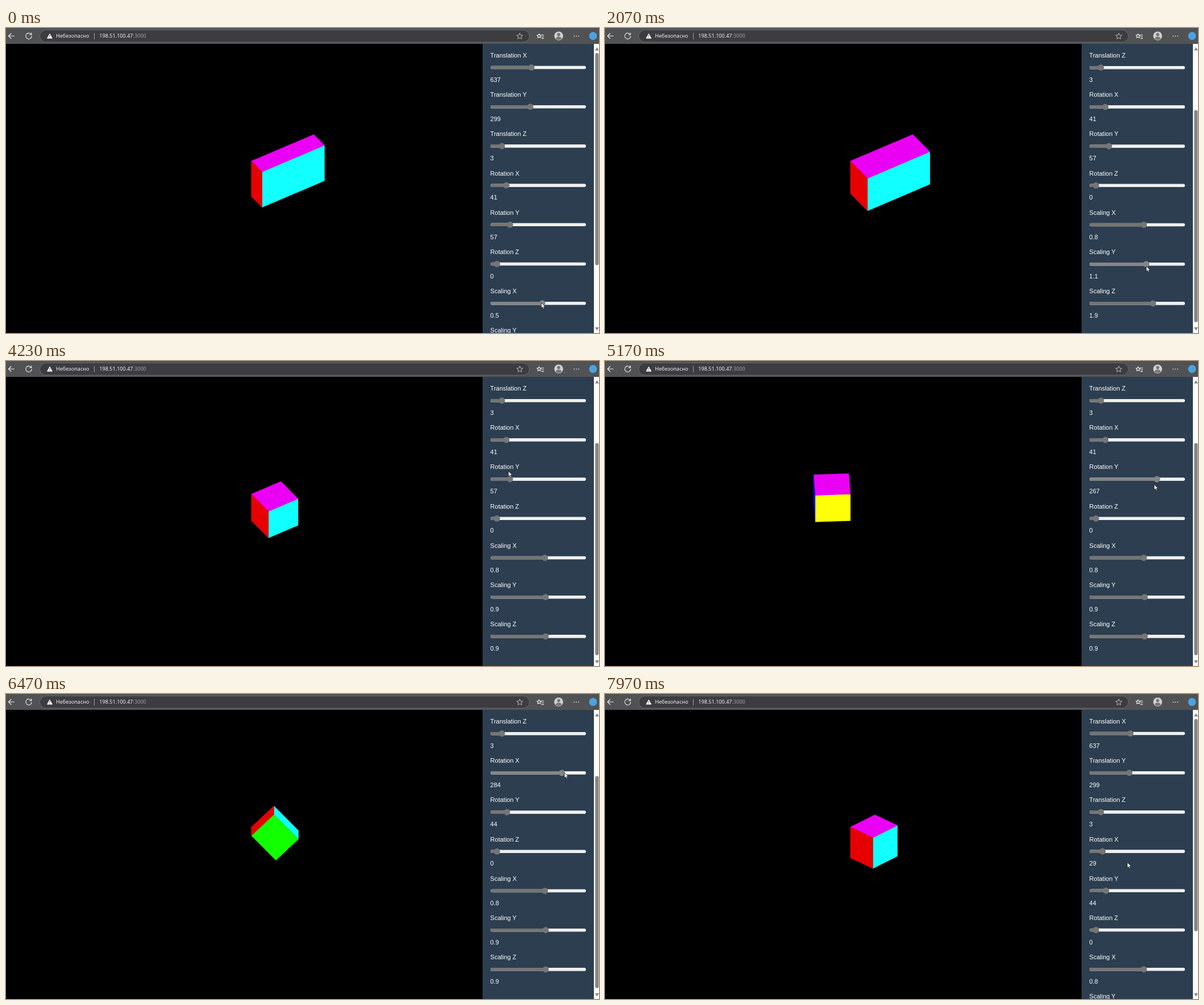
Animation of 1044x537 px, one loop 8000 ms. Source, as an HTML page:

```html
<!DOCTYPE html>
<html lang="en">
<head>
<meta charset="utf-8">
<title>Box transform controls</title>
<style>
  html, body { margin: 0; width: 100%; height: 100%; overflow: hidden; background: #000; }
  svg { display: block; width: 1044px; height: 537px; }
  .bar { font: 9.1px "Open Sans", "Noto Sans", sans-serif; fill: #fff; }
  .panel text { font: 11px "Liberation Sans", Arial, sans-serif; fill: #fff; }
  .icon { fill: none; stroke: #f2f2f2; stroke-width: 1.1; stroke-linecap: round; stroke-linejoin: round; }
</style>
</head>
<body>
<svg viewBox="0 0 1044 537">
  <defs>
    <clipPath id="view"><rect x="839" y="28" width="196" height="509"/></clipPath>
  </defs>
  <rect width="1044" height="537"/>
  <g id="box" stroke-width=".5" stroke-linejoin="round"></g>

  <rect x="839" y="28" width="196" height="509" fill="#2c3e50"/>
  <g clip-path="url(#view)"><g id="rows" class="panel"></g></g>

  <rect x="1035" y="28" width="9" height="509" fill="#fafafa"/>
  <path d="M1037 39.5l3.5-5.5 3.5 5.5zM1037 527l3.5 5.5 3.5-5.5z" fill="#858585"/>
  <rect id="scroll" x="1037.3" y="44" width="6.2" height="373.5" rx="3.1" fill="#858585"/>

  <g id="toolbar">
    <rect width="1044" height="28" fill="#515254"/>
    <rect x="59.5" y="3.5" width="862" height="21.5" rx="10.7" fill="#3c3c41" stroke="#6a6a6c"/>
    <path class="icon" d="M14.5 14H4.5M9 9.5L4.5 14 9 18.5"/>
    <path class="icon" d="M44.3 11.2A5.2 5.2 0 1 0 45.2 14.2M44.8 8.5V11.7H41.6"/>
    <path d="M77 10l4.6 8.2h-9.2z" fill="#fff" stroke="#fff" stroke-width=".6" stroke-linejoin="round"/>
    <path d="M77 12.7v2.6M77 16.3v1" stroke="#3c3c41"/>
    <text class="bar" x="88" y="17.3">Небезопасно</text>
    <path d="M155.5 9v11" stroke="#a0a0a2"/>
    <text class="bar" x="164.3" y="17.3">198.51.100.47<tspan fill="#a9a9ab">:3000</tspan></text>
    <path id="star" class="icon" style="stroke:#a5a5a7"/>
    <path id="fav" class="icon"/>
    <path class="icon" d="M942 12.2h4.5M943 15.3h3.5M943 18.4h3.5"/>
    <circle cx="973" cy="14" r="7.8" fill="#d2d2d2"/>
    <circle cx="973" cy="11.6" r="2.8" fill="#777"/>
    <path d="M967.8 19c0-5 10.4-5 10.4 0a7.8 7.8 0 0 1-10.4 0z" fill="#777"/>
    <path d="M1000.2 14.3h.01M1004.2 14.3h.01M1008.2 14.3h.01" class="icon" style="stroke-width:1.7"/>
    <circle cx="1033.5" cy="14" r="7" fill="#4aa3e0"/>
  </g>

  <path id="cursor" d="M0 0V9.3L2.2 7.3 3.8 10.8 5.3 10.1 3.8 6.8H6.8Z" fill="#fff" stroke="#111" stroke-width=".7"/>
</svg>
<script>
const LOOP = 8000, UNIT = 69, ORIGIN = [432, 234.3];
const ROW = 69.2, MAX_SCROLL = 138.2;
const $ = id => document.getElementById(id);

function el(parent, tag, attrs) {
  const node = document.createElementNS('http://www.w3.org/2000/svg', tag);
  set(node, attrs);
  return parent.appendChild(node);
}
function set(node, attrs) {
  for (const key in attrs) node.setAttribute(key, attrs[key]);
}

// Smooth curve through [time, value] keys that never overshoots them.
function track(...keys) {
  const slopes = keys.slice(1).map((k, i) => (k[1] - keys[i][1]) / (k[0] - keys[i][0]));
  const tangent = i => {
    const a = slopes[i - 1] || 0, b = slopes[i] || 0;
    return a * b > 0 ? 2 * a * b / (a + b) : 0;
  };
  return t => {
    if (t <= keys[0][0]) return keys[0][1];
    const i = keys.findIndex(k => k[0] >= t) - 1;
    if (i < 0) return keys[keys.length - 1][1];
    const [t0, v0] = keys[i], [t1, v1] = keys[i + 1];
    const d = t1 - t0, u = (t - t0) / d, w = 1 - u;
    return v0 * w * w * (1 + 2 * u) + v1 * u * u * (3 - 2 * u)
      + d * u * w * (tangent(i) * w - tangent(i + 1) * u);
  };
}

const rotX = track([6020, 41], [6470, 284], [6640, 335], [7260, 29]);
const rotY = track([4350, 57], [4960, 325], [5170, 267], [5720, 44]);
const scaleX = track([80, .5], [700, .8]);
const scaleY = track([1800, 1.2], [2070, 1.1], [2400, .9]);
const scaleZ = track([2700, 1.9], [3500, .9]);
const scrollTop = track([1010, 0], [1070, 8.8], [1400, MAX_SCROLL], [7490, MAX_SCROLL], [7880, 0]);

const path = [
  [0, 942.5, 484], [600, 947, 484], [800, 950, 482], [1070, 960, 460], [1400, 961, 440],
  [1750, 954, 419], [2070, 953, 419.5], [2420, 951, 420], [2680, 965, 487], [3500, 950, 488],
  [3720, 946, 480], [4230, 884.5, 194], [4350, 886, 208], [4940, 993, 215], [5170, 967, 217.5],
  [5720, 881, 215], [5960, 880, 139], [6050, 883, 139], [6470, 983, 138.5], [6640, 1001, 140],
  [7260, 877, 141], [7520, 905, 250], [7970, 919.5, 296.5]
];
const cursorX = track(...path.map(p => [p[0], p[1]]));
const cursorY = track(...path.map(p => [p[0], p[2]]));

const fixed = v => () => v;
const whole = f => t => Math.round(f(t));
const tenth = f => t => Math.round(f(t) * 10) / 10;
const angleAt = v => 864.3 + .4025 * v;
const scaleAt = v => 936.9 + 14.6 * v;

const sliders = [
  ['Translation X', fixed(637), fixed(925)],
  ['Translation Y', fixed(299), fixed(923)],
  ['Translation Z', fixed(3), fixed(873)],
  ['Rotation X', whole(rotX), angleAt],
  ['Rotation Y', whole(rotY), angleAt],
  ['Rotation Z', fixed(0), angleAt],
  ['Scaling X', tenth(scaleX), scaleAt],
  ['Scaling Y', tenth(scaleY), scaleAt],
  ['Scaling Z', tenth(scaleZ), scaleAt]
].map(([label, value, place], i) => {
  const y = 69.5 + i * ROW;
  el($('rows'), 'text', { x: 852.6, y: y - 17.6 }).textContent = label;
  el($('rows'), 'rect', { x: 853, y: y - 2.8, width: 168, height: 5.6, rx: 2.8, fill: '#efefef' });
  return {
    value, place, y,
    fill: el($('rows'), 'rect', { x: 853, y: y - 2.8, height: 5.6, rx: 2.8 }),
    thumb: el($('rows'), 'circle', { cy: y, r: 5.5 }),
    text: el($('rows'), 'text', { x: 852.6, y: y + 25.2 })
  };
});

const faces = [0, 1, 2].map(() => el($('box'), 'polygon', {}));

function starPath(cx, cy, r) {
  const points = Array.from({ length: 10 }, (_, i) => {
    const a = i * Math.PI / 5 - Math.PI / 2, d = i % 2 ? r * .48 : r;
    return [(cx + d * Math.cos(a)).toFixed(1), (cy + d * Math.sin(a)).toFixed(1)];
  });
  return 'M' + points.join('L') + 'Z';
}
set($('star'), { d: starPath(904.5, 14.6, 5.6) });
set($('fav'), { d: starPath(938.5, 14, 4) });

function drawBox([rx, ry, , sx, sy, sz]) {
  const a = rx * Math.PI / 180, b = ry * Math.PI / 180;
  const X = [Math.cos(b), Math.sin(b) * Math.sin(a)].map(v => v * sx * UNIT);
  const Y = [0, Math.cos(a)].map(v => v * sy * UNIT);
  const Z = [Math.sin(b), -Math.cos(b) * Math.sin(a)].map(v => v * sz * UNIT);
  // Of each opposite pair only the face turned to the viewer is drawn.
  const pairs = [
    [Y, Z, X, '#ffff08', '#12ffff'],
    [Z, X, Y, '#ea00f2', '#12ff00'],
    [X, Y, Z, '#e60000', '#0a00f0']
  ];
  pairs.forEach(([u, v, n, near, far], i) => {
    const isFar = u[0] * v[1] - u[1] * v[0] < 0;
    const corner = (p, q) => [0, 1].map(k => ORIGIN[k] + (isFar ? n[k] : 0) + p * u[k] + q * v[k]);
    const color = isFar ? far : near;
    set(faces[i], {
      points: [corner(0, 0), corner(1, 0), corner(1, 1), corner(0, 1)].join(' '),
      fill: color, stroke: color
    });
  });
}

function draw(t) {
  const top = scrollTop(t), cx = cursorX(t), cy = cursorY(t);
  const values = sliders.map(s => {
    const v = s.value(t), x = s.place(v);
    const active = Math.abs(s.y - top - cy) < 12;
    const color = active ? '#858585' : '#757575';
    set(s.fill, { width: x - 853, fill: color });
    set(s.thumb, { cx: x, fill: color });
    s.text.textContent = v;
    return v;
  });
  drawBox(values.slice(3));
  set($('rows'), { transform: `translate(0 ${-top})` });
  set($('scroll'), { y: 44 + top * .727 });
  set($('cursor'), { transform: `translate(${cx} ${cy})` });
}

const start = performance.now();
function tick() {
  draw((performance.now() - start) % LOOP);
  requestAnimationFrame(tick);
}
tick();
</script>
</body>
</html>
```
